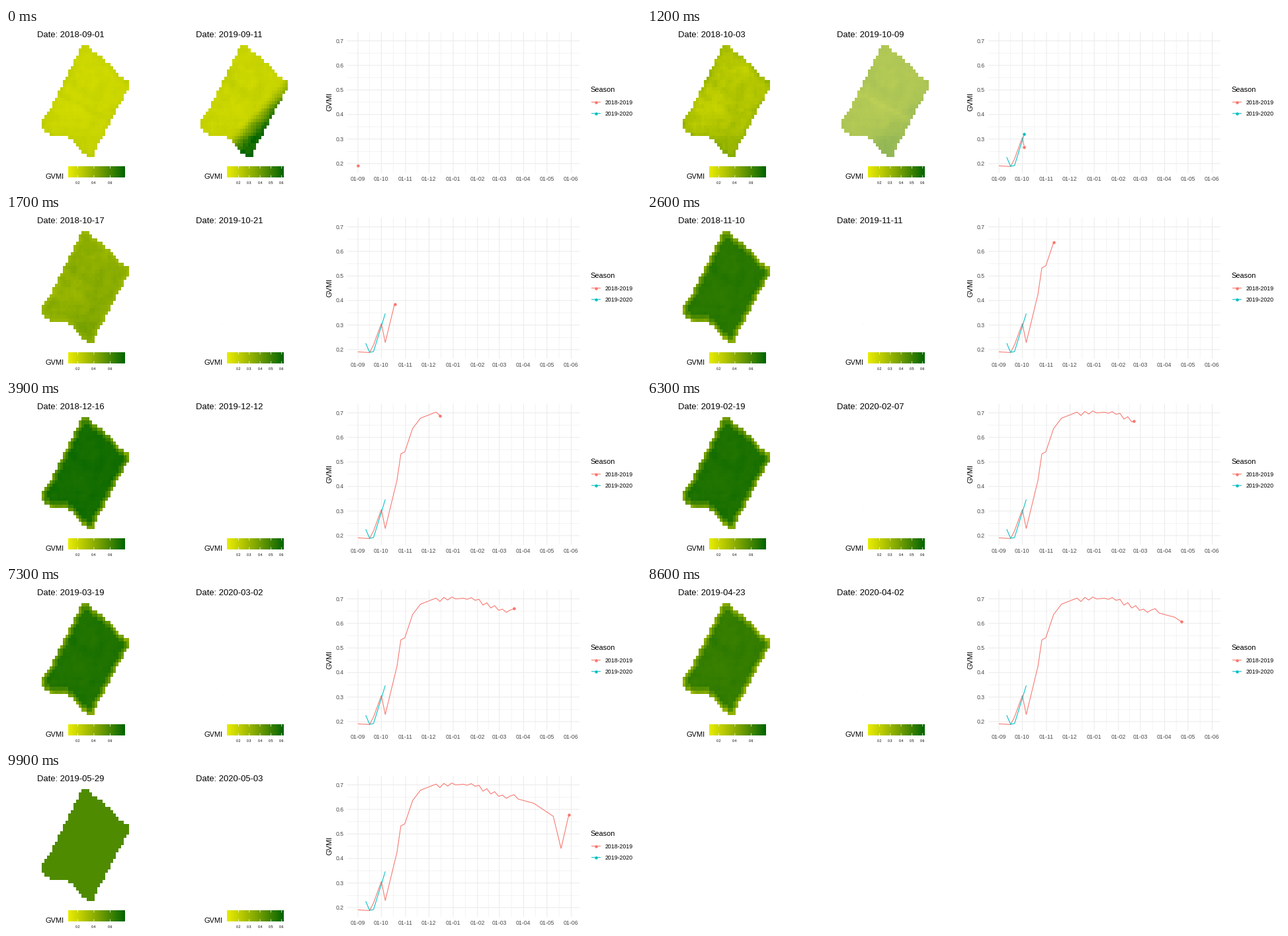
These frames come from a looping animation (960x240 px, 10 s). A matplotlib script:

```python
import numpy as np
import matplotlib.pyplot as plt
from matplotlib.animation import FuncAnimation
from matplotlib.path import Path

W, H, DPI = 960, 240, 80
FRAMES, INTERVAL = 100, 100
LAST = FRAMES - 1
SEASON = 270  # days covered by the first season
PX = 72 / DPI  # points per pixel
RED, TEAL, GRID, GREY = "#F8766D", "#00BFC4", "#EBEBEB", "#4D4D4D"
ROWS, COLS = 32, 33
LEFT, RIGHT, TOP, BOTTOM = 54, 186, 26, 196

plt.rcParams["font.family"] = "Liberation Sans"
fig = plt.figure(figsize=(W / DPI, H / DPI), dpi=DPI, facecolor="white")
ax = fig.add_axes([0, 0, 1, 1])


def label(x, y, s, size, color="black", ha="left", va="baseline", **kw):
    return ax.text(x, y, s, fontsize=size * PX, color=color, ha=ha, va=va, **kw)


def stroke(xs, ys, color, width, z=2):
    return ax.plot(xs, ys, color=color, lw=width * PX, zorder=z, snap=False,
                   solid_capstyle="butt", solid_joinstyle="round")[0]


def dot(x, y, color):
    return ax.plot([x], [y], "o", color=color, ms=4.5 * PX, mew=0, zorder=4,
                   snap=False)[0]


def image(data, x0, x1, y0, y1):
    # The small inset keeps rounding from growing the image by a pixel.
    e = 0.02
    return ax.imshow(data, extent=(x0 + e, x1 - e, y1 - e, y0 + e),
                     aspect="auto", interpolation="nearest", zorder=2)


def lin(x, a, b):
    return np.clip((x - a) / (b - a), 0, 1)


def ramp(t):
    """Yellow to dark green."""
    rgb = [232 - 176 * t - 56 * t * t, 236 - 136 * t, 0 * t]
    return np.stack(rgb, axis=-1) / 255


# ---- field geometry -------------------------------------------------------
outline = Path([(118, 25), (122, 26), (152, 50), (170, 73), (187, 79), (187, 91),
                (175, 111), (132, 192), (132, 197), (124, 197), (96, 167),
                (64, 161), (53, 149), (53, 138), (62, 132), (116, 25)])
cx = LEFT + (np.arange(COLS) + 0.5) * (RIGHT - LEFT) / COLS
cy = TOP + (np.arange(ROWS) + 0.5) * (BOTTOM - TOP) / ROWS
X, Y = np.meshgrid(cx, cy)
inside = outline.contains_points(np.c_[X.ravel(), Y.ravel()]).reshape(X.shape)


def neighbours(a, mode):
    p = np.pad(a, 1, mode=mode)
    return p[:-2, 1:-1], p[2:, 1:-1], p[1:-1, :-2], p[1:-1, 2:]


def erode(m):
    return m & np.logical_and.reduce(neighbours(m, "constant"))


def noise(rng, passes):
    a = rng.normal(size=X.shape)
    for _ in range(passes):
        a = (sum(neighbours(a, "edge")) + 2 * a) / 6
    return a / a.std()


def blob(x, y, rx, ry):
    return np.exp(-((X - x) / rx) ** 2 - ((Y - y) / ry) ** 2)


rng = np.random.default_rng(7)
grain, cloud = noise(rng, 1), noise(rng, 5)
texture = 0.6 * grain + 0.6 * cloud
core = erode(inside)
edge = np.where(core, np.where(erode(core), 0, 0.4), 1) * (1 + 0.15 * grain)

track = np.exp(-((Y - 100 - 0.53 * (X - 82)) / 5) ** 2)
corner = blob(122, 180, 24, 24)
bare = 0.025 * track + 0.02 * blob(66, 140, 18, 22) + 0.015 * corner
autumn = (0.02 + 0.07 * corner - 0.05 * blob(80, 125, 22, 24)
          - 0.04 * blob(108, 110, 14, 22) - 0.06 * blob(146, 64, 10, 16)
          + 0.03 * edge + 0.01 * grain)
slope = lin(0.73 * (X - 176) + 0.69 * (Y - 100), -14, 20)
regrowth = slope * slope * (3 - 2 * slope) * (1 + 0.06 * grain)


# ---- data -----------------------------------------------------------------
def key(days):
    """Animation step at which each day of the season falls."""
    return np.floor(days * LAST / SEASON + 0.5)


# One pass every five days, except for the cloudy spells.
days1 = np.arange(0, SEASON + 1, 5)
for a, b in [(5, 10), (25, 25), (40, 45), (65, 65), (85, 95), (130, 130),
             (210, 220), (230, 245)]:
    days1 = days1[(days1 < a) | (days1 > b)]

trend = np.array([(0, .191), (15, .188), (20, .219), (30, .306), (35, .229),
                  (50, .425), (55, .533), (60, .541), (70, .636), (80, .678),
                  (100, .695), (120, .703), (150, .700), (160, .682), (190, .648),
                  (200, .659), (205, .645), (225, .625), (250, .572),
                  (260, .441), (270, .579)])
wiggle = 0.008 * np.cos(12 * np.pi * (days1 - 100) / 65)
plateau = (days1 >= 100) & (days1 <= 205)
gvmi1 = np.interp(days1, *trend.T) + wiggle * plateau
days2 = np.array([10, 15, 20, 35])
gvmi2 = np.array([.226, .189, .192, .347])


def px(day):
    return 532 + 1.1813 * day


def py(v):
    return 206 - 373 * (v - 0.2)


def left_field(f):
    day = f * SEASON / LAST
    green, ripe = lin(day, 35, 70), lin(day, 235, 270)
    fall = max(0, 1 - abs(day - 32) / 38)
    rim = 0.015 - 0.26 * green
    v = (np.interp(f, key(days1), gvmi1) + fall * autumn + (1 - green) * bare
         + (1 - ripe) * (rim * (edge - 0.2) + 0.01 * texture))
    return v, 1


def right_field(f):
    grow = lin(f, 4, 11)
    v = (0.185 + 0.155 * grow + (0.05 + 0.35 * (1 - lin(f, 0, 2))) * regrowth
         + grow * (0.05 * corner - 0.03 * track) + 0.012 * texture)
    return v, 1 - lin(f, 11, 14)


# ---- maps -----------------------------------------------------------------
class FieldMap:
    def __init__(self, dx, start, span, limits, ticks, field):
        self.start, self.span, self.field = np.datetime64(start), span, field
        self.limits = limits
        self.title = label(47 + dx, 14, "", 13)
        self.img = image(np.zeros((ROWS, COLS, 4)), LEFT + dx, RIGHT + dx, TOP, BOTTOM)
        x0, x1, y0, y1 = 94 + dx, 180 + dx, 210, 227
        image(ramp(np.linspace(0, 1, x1 - x0))[None], x0, x1, y0, y1)
        label(59.7 + dx, 229, "GVMI", 11)
        for t in ticks:
            x = x0 + lin(t, *limits) * (x1 - x0)
            stroke([x, x], [y0, y0 + 3.4], "white", 0.7, 3)
            stroke([x, x], [y1 - 3.4, y1], "white", 0.7, 3)
            label(x, 237, f"{t:.1f}", 5.2, ha="center")

    def draw(self, f):
        self.title.set_text(f"Date: {self.start + f * self.span // LAST}")
        v, alpha = self.field(f)
        self.img.set_data(np.dstack([ramp(lin(v, *self.limits)), inside * alpha]))


maps = [FieldMap(0, "2018-09-01", SEASON, (.082, .785), np.arange(2, 7, 2) / 10,
                 left_field),
        FieldMap(240, "2019-09-11", 235, (.093, .620), np.arange(2, 7) / 10,
                 right_field)]
speck = stroke([326.5, 327.5], [166.5, 166.5], "#eeeeee", 1, 1)

# ---- chart ----------------------------------------------------------------
X0, X1, Y0, Y1 = 516, 867, 5.5, 220


def vline(x, width):
    stroke([x, x], [Y0, Y1], GRID, width, width)


def hline(y, width):
    stroke([X0, X1], [y, y], GRID, width, width)


months = np.arange("2018-09", "2019-07", dtype="datetime64[M]")
firsts = (months.astype("datetime64[D]") - np.datetime64("2018-09-01")).astype(int)
levels = np.arange(2, 8) / 10
for x in px((firsts[1:] + firsts[:-1]) / 2):
    vline(x, 0.53)
for y in py(levels[:-1] + 0.05):
    hline(y, 0.53)
for month, x in zip(months, px(firsts)):
    vline(x, 1.07)
    label(x - 0.3, 232, f"01-{str(month)[-2:]}", 8.8, GREY, ha="center")
for v in levels:
    hline(py(v), 1.07)
    label(511, py(v) + 3.1, f"{v:.1f}", 8.8, GREY, ha="right")
label(489.5, 111.5, "GVMI", 11, ha="center", va="center", rotation=90)

label(883, 97, "Season", 11)
for y, color, name in [(112.5, RED, "2018-2019"), (129.8, TEAL, "2019-2020")]:
    stroke([885, 899], [y, y], color, 1.07)
    dot(892, y, color)
    label(906, y + 3.2, name, 8.8)


class Series:
    def __init__(self, days, vals, color):
        self.keys, self.days, self.vals = key(days), days, vals
        self.line = stroke([], [], color, 1.07, 3)
        self.head = dot(0, 0, color)

    def draw(self, f):
        day = np.interp(f, self.keys, self.days)
        val = np.interp(f, self.keys, self.vals)
        n = np.count_nonzero(self.keys <= f)
        self.line.set_visible(n > 0)
        self.head.set_visible(n > 0 and f <= self.keys[-1])
        self.line.set_data(px(np.append(self.days[:n], day)),
                           py(np.append(self.vals[:n], val)))
        self.head.set_data([px(day)], [py(val)])


series = [Series(days1, gvmi1, RED), Series(days2, gvmi2, TEAL)]

ax.set_xlim(0, W)
ax.set_ylim(H, 0)
ax.axis("off")


def update(f):
    for part in maps + series:
        part.draw(f)
    speck.set_visible(f >= 14)
    return []


anim = FuncAnimation(fig, update, frames=FRAMES, interval=INTERVAL,
                     init_func=lambda: update(0), repeat=True, repeat_delay=0)
plt.show()
```
